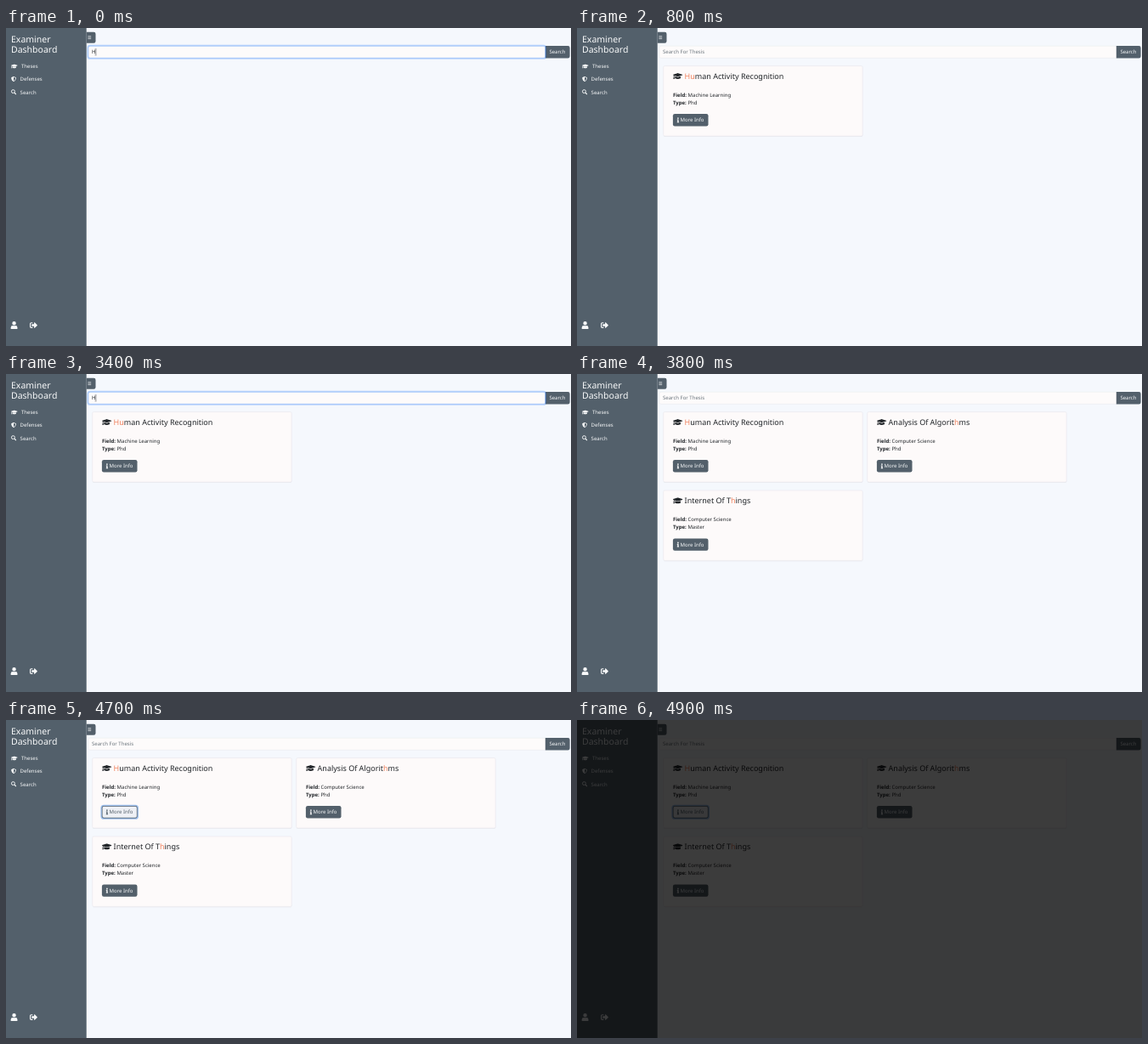
An HTML page that plays this animation: 665x374 px, repeating every 5000 ms.

```html
<!DOCTYPE html>
<html lang="en">
<head>
<meta charset="utf-8">
<title>Examiner Dashboard</title>
<style>
  html, body { margin: 0; width: 100%; height: 100%; overflow: hidden; background: #f5f8fd; }
  svg.stage { display: block; width: 100vw; height: 100vh; }
  text { font: 6px "Noto Sans", "Open Sans", sans-serif; fill: #212529; text-rendering: geometricPrecision; }
  .side text, .light { fill: #f8f9fa; }
  .side .brand { font-size: 10.5px; font-weight: 500; }
  .title { font-size: 9px; font-weight: 500; }
  .b { font-weight: 700; }
  .hi { fill: #f08360; }
  .slate { fill: #53606b; }
  .hint { fill: #6c757d; }

  .anim { animation: 5s step-end -5ms infinite; }
  .glow { animation-name: glow; }
  .empty { animation-name: empty; }
  .typed-h { animation-name: typed-h; }
  .typed-hu { animation-name: typed-hu; }
  .caret { animation-name: caret; }
  .first { animation-name: first; }
  .second { animation-name: second; }
  .hot { animation-name: hot; }
  .ring { animation-name: ring; }
  .dim { animation-name: dim; }

  @keyframes glow {
    0% { opacity: 1; } 14% { opacity: .45; } 16% { opacity: 0; }
    60% { opacity: .6; } 62% { opacity: 1; } 74% { opacity: .45; } 76%, 100% { opacity: 0; }
  }
  @keyframes empty {
    0% { opacity: 0; } 14% { opacity: 1; } 64% { opacity: 0; } 74%, 100% { opacity: 1; }
  }
  @keyframes typed-h {
    0% { opacity: 1; } 2% { opacity: 0; } 64% { opacity: 1; } 74%, 100% { opacity: 0; }
  }
  @keyframes typed-hu {
    0% { opacity: 0; } 2% { opacity: 1; } 14%, 100% { opacity: 0; }
  }
  @keyframes caret {
    0% { opacity: 1; transform: translateX(4.6px); }
    2% { opacity: 1; transform: translateX(8.3px); }
    10% { opacity: 0; transform: none; }
    58% { opacity: 1; transform: none; }
    64% { opacity: 1; transform: translateX(4.6px); }
    74%, 100% { opacity: 0; transform: none; }
  }
  @keyframes first {
    0% { opacity: 0; } 10% { opacity: 1; } 70%, 100% { opacity: 0; }
  }
  @keyframes second {
    0% { opacity: 0; } 70%, 100% { opacity: 1; }
  }
  @keyframes hot {
    0% { opacity: 0; } 90% { opacity: .5; } 92%, 100% { opacity: 1; }
  }
  @keyframes ring {
    0% { opacity: 0; } 92% { opacity: .5; } 94%, 100% { opacity: 1; }
  }
  @keyframes dim {
    0% { opacity: 0; } 96% { opacity: .4; } 98%, 100% { opacity: .76; }
  }
</style>
</head>
<body>
<svg class="stage" viewBox="0 0 665 374" preserveAspectRatio="none">
  <defs>
    <path id="cap" d="M622 153 343 67c-15-5-31-5-46 0L18 153c-24 7-24 40 0 47l49 15c-11 13-17 29-18 46-10 6-17 16-17 28 0 11 6 21 15 27L21 428c-2 10 5 20 16 20h55c10 0 18-10 16-20L82 316c9-6 15-16 15-27s-7-22-16-28c1-13 8-25 19-32l197 60c9 3 26 6 46 0l279-86c24-7 24-40 0-47zM353 320c-33 10-59 3-66 0l-145-44-14 108c0 35 86 64 192 64s192-29 192-64l-14-108z"/>
    <path id="shield" fill-rule="evenodd" d="M466 84 274 4a48 48 0 0 0-37 0L45 84c-18 7-30 25-30 44 0 199 114 336 222 381 12 5 25 5 37 0 87-36 222-160 222-381 0-19-12-37-30-44zM256 446V66l176 73c-3 152-82 260-176 307z"/>
    <path id="user" d="M224 0a128 128 0 1 1 0 256 128 128 0 0 1 0-256zM314 288h-17a174 174 0 0 1-146 0h-17A134 134 0 0 0 0 422v42a48 48 0 0 0 48 48h352a48 48 0 0 0 48-48v-42a134 134 0 0 0-134-134z"/>
    <path id="exit" d="M497 273 329 441c-15 15-41 4-41-17v-96H152c-13 0-24-11-24-24v-96c0-13 11-24 24-24h136V88c0-21 26-32 41-17l168 168c9 9 9 25 0 34zM192 436v-40c0-7-5-12-12-12H96c-18 0-32-14-32-32V160c0-18 14-32 32-32h84c7 0 12-5 12-12V76c0-7-5-12-12-12H96c-53 0-96 43-96 96v192c0 53 43 96 96 96h84c7 0 12-5 12-12z"/>
    <path id="info" d="M20 424h20V280H20c-11 0-20-9-20-20v-48c0-11 9-20 20-20h112c11 0 20 9 20 20v212h20c11 0 20 9 20 20v48c0 11-9 20-20 20H20c-11 0-20-9-20-20v-48c0-11 9-20 20-20zM96 0a72 72 0 1 1 0 144 72 72 0 0 1 0-144z"/>
    <g id="card">
      <rect x="102" y="45.5" width="234.4" height="82.6" rx="1.5" fill="#000" opacity=".04"/>
      <rect x="101.7" y="44.6" width="234.4" height="82.4" rx="1.5" fill="#fdfafa" stroke="#e4e3e8" stroke-width=".5"/>
      <use href="#cap" fill="#212529" transform="translate(113 52) scale(.01758)"/>
      <rect class="slate" x="112.9" y="101.1" width="41.6" height="14.3" rx="2.2"/>
      <use href="#info" class="light" transform="translate(117.8 105.2) scale(.01172)"/>
      <text class="light" x="121.6" y="110.4">More Info</text>
    </g>
  </defs>

  <rect width="665" height="374" fill="#f5f8fd"/>

  <g class="side">
    <rect class="slate" width="94.7" height="374"/>
    <text class="brand" x="6" y="16.7">Examiner</text>
    <text class="brand" x="6" y="29.2">Dashboard</text>
    <g class="light">
      <use href="#cap" transform="translate(6 42) scale(.01172)"/>
      <use href="#shield" transform="translate(6 57) scale(.01172)"/>
      <circle cx="8.4" cy="74.6" r="1.95" fill="none" stroke="#f8f9fa" stroke-width=".95"/>
      <path d="M9.9 76.1 11.8 78" stroke="#f8f9fa" stroke-width="1.15"/>
      <use href="#user" transform="translate(5.6 345) scale(.01758)"/>
      <use href="#exit" transform="translate(28 345.1) scale(.01758)"/>
    </g>
    <text x="18" y="47.3">Theses</text>
    <text x="16.6" y="62.3">Defenses</text>
    <text x="16.6" y="77.5">Search</text>
  </g>

  <path class="slate" d="M94.7 4.7h8.6a2.2 2.2 0 0 1 2.2 2.2v8.6a2.2 2.2 0 0 1-2.2 2.2h-8.6z"/>
  <path d="M96.4 9.7h3.8M96.4 11.2h3.8M96.4 12.7h3.8" stroke="#f8f9fa" stroke-width=".6"/>

  <!-- search bar -->
  <path d="M635 21.2h-536a2.2 2.2 0 0 0-2.2 2.2v9.8a2.2 2.2 0 0 0 2.2 2.2h536z" fill="#fdfbfb" stroke="#e0e3e9" stroke-width=".4"/>
  <path class="slate" d="M634.8 21.1h26.6a2.2 2.2 0 0 1 2.2 2.2v9.9a2.2 2.2 0 0 1-2.2 2.2h-26.6z"/>
  <text class="light" x="639.4" y="30.4">Search</text>
  <g class="anim glow" fill="none">
    <rect x="96.1" y="20.5" width="539.3" height="15.6" rx="2.9" stroke="#0d6efd" stroke-opacity=".25" stroke-width="1.5"/>
    <rect x="96.9" y="21.3" width="537.8" height="14" rx="2.2" stroke="#86b7fe" stroke-width=".5"/>
  </g>
  <text class="anim empty hint" x="101" y="30.4">Search For Thesis</text>
  <text class="anim typed-h" x="101" y="30.4">H</text>
  <text class="anim typed-hu" x="101" y="30.4">Hu</text>
  <rect class="anim caret" x="100.7" y="24" width=".6" height="8.6" fill="#212529"/>

  <g class="anim first">
    <use href="#card"/>
    <text class="title" x="126.6" y="59.8"><tspan class="hi">Hu</tspan>man Activity Recognition</text>
    <text x="113" y="80.6"><tspan class="b">Field:</tspan> Machine Learning</text>
    <text x="113" y="89.6"><tspan class="b">Type:</tspan> Phd</text>
  </g>

  <g class="anim second">
    <use href="#card"/>
    <text class="title" x="126.6" y="59.8"><tspan class="hi">H</tspan>uman Activity Recognition</text>
    <text x="113" y="80.6"><tspan class="b">Field:</tspan> Machine Learning</text>
    <text x="113" y="89.6"><tspan class="b">Type:</tspan> Phd</text>

    <g transform="translate(240 0)">
      <use href="#card"/>
      <text class="title" x="126.6" y="59.8">Analysis Of Algorit<tspan class="hi">h</tspan>ms</text>
      <text x="113" y="80.6"><tspan class="b">Field:</tspan> Computer Science</text>
      <text x="113" y="89.6"><tspan class="b">Type:</tspan> Phd</text>
    </g>

    <g transform="translate(0 92.4)">
      <use href="#card"/>
      <text class="title" x="126.6" y="59.8">Internet Of T<tspan class="hi">h</tspan>ings</text>
      <text x="113" y="80.6"><tspan class="b">Field:</tspan> Computer Science</text>
      <text x="113" y="89.6"><tspan class="b">Type:</tspan> Master</text>
    </g>
  </g>

  <!-- pressed button -->
  <rect class="anim ring" x="112.2" y="100.4" width="43" height="15.7" rx="2.9" fill="none" stroke="#3f83e0" stroke-opacity=".5" stroke-width="1.5"/>
  <g class="anim hot">
    <rect x="113.2" y="101.4" width="41" height="13.7" rx="2" fill="#eef0f5" stroke="#53606b" stroke-width=".6"/>
    <use href="#info" class="slate" transform="translate(117.8 105.2) scale(.01172)"/>
    <text class="slate" x="121.6" y="110.4">More Info</text>
  </g>

  <rect class="anim dim" width="665" height="374" fill="#000"/>
</svg>
</body>
</html>
```
